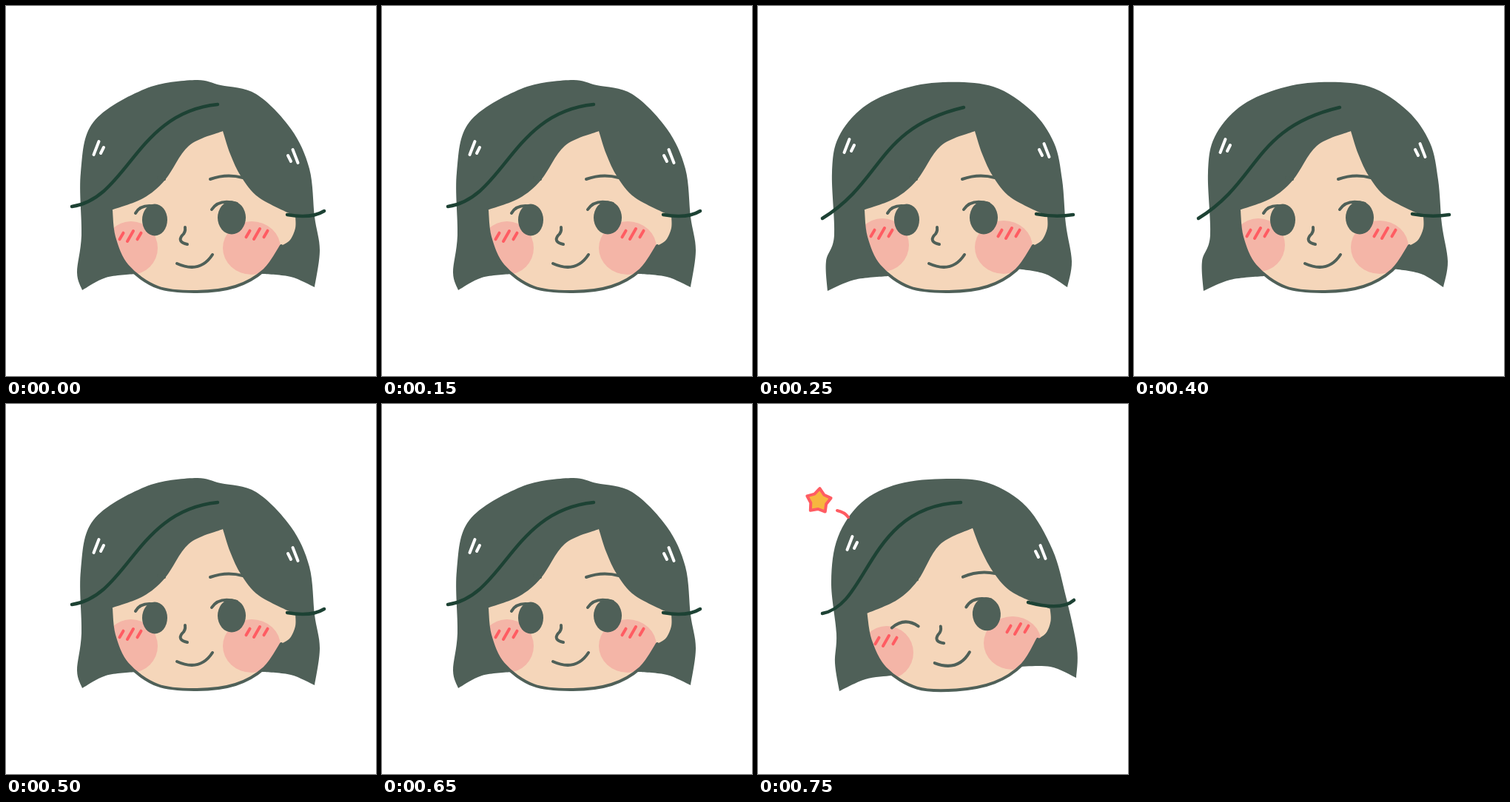
Recreate the animation shown at these times as an HTML page. Size 500 by 500 pixels, loop 1000 ms.

```html
<!DOCTYPE html>
<html lang="en">
<head>
<meta charset="utf-8">
<title>Winking girl</title>
<style>
html, body { margin: 0; width: 100%; height: 100%; overflow: hidden; background: #fff; }
svg { display: block; width: 100vw; height: 100vh; }
.line { fill: none; stroke-width: 4; stroke-linecap: round; stroke-linejoin: round; }
</style>
</head>
<body>
<svg id="stage" viewBox="0 0 500 500"></svg>
<script>
const HAIR = '#4f6058', SKIN = '#f5d6ba', CHEEK = '#f4b5a7', BLUSH = '#ff5c62',
      STRAND = '#1d4234', SHINE = '#ffffff', STAR = '#f7b63f';
const STEP = 250;

// Smooth runs of key points; "|" marks a corner.
const JAW = '142,276 146,312 164,351 205,380 258,386 310,379 349,357 372,324';
const FACE = JAW + '| 384,316 391,300 391,284 | 342,259 318,231 303,200 293,169'
  + '| 247,189 215,235 185,260 142,276';

const poses = [
  {
    hair: '103,384 | 96,360 102,310 101,225 118,157 188,112 255,100 290,107 338,119 385,166 410,220 417,285 424,330 417,380 | 385,366 347,362 | 175,362 | 135,367 103,384',
    strands: ['M89 271C165 260 175 144 286 133', 'M380 282Q412 288 430 277'],
    blush: [[168, 311], [339, 308]],
    shine: [[122, 192], [391, 203]]
  },
  {
    hair: '94,385 | 92,345 103,310 100,225 109,177 142,137 192,113 250,103 318,109 370,142 400,185 411,235 416,295 424,345 418,380 | 388,362 350,355 | 175,365 | 130,370 94,385',
    strands: ['M87 287C170 236 160 165 278 137', 'M376 281Q402 286 426 282'],
    blush: [[167, 307], [339, 307]],
    shine: [[120, 189], [390, 195]]
  },
  {
    hair: '110,388 | 104,350 106,310 99,240 108,180 140,133 190,108 255,101 312,107 363,139 398,197 416,260 431,330 430,370 | 395,355 350,355 | 180,367 | 145,372 110,388',
    strands: ['M87 283C150 272 148 138 274 133', 'M365 268Q410 280 427 265'],
    blush: [[173, 320], [351, 304]],
    shine: [[124, 188], [385, 200]],
    tilt: -3.4,
    wink: true
  }
];
const sequence = [0, 1, 0, 2];

// Catmull-Rom spline written as cubic Béziers
function curve(points) {
  return points.slice(1).map((end, i) => {
    const start = points[i], before = points[i - 1] || start, after = points[i + 2] || end;
    const c1 = start.map((v, k) => v + (end[k] - before[k]) / 6);
    const c2 = end.map((v, k) => v - (after[k] - start[k]) / 6);
    return `C${c1} ${c2} ${end}`;
  }).join('');
}

function smooth(text) {
  const runs = text.split('|').map(run => run.trim().split(' ').map(p => p.split(',').map(Number)));
  return 'M' + runs[0][0] + runs.map((run, i) =>
    curve(i ? [runs[i - 1].at(-1), ...run] : run)).join('');
}

const line = (d, color, width = 4) =>
  `<path class="line" d="${d}" stroke="${color}" style="stroke-width:${width}"/>`;
const ellipse = (cx, cy, rx, ry, fill) =>
  `<ellipse cx="${cx}" cy="${cy}" rx="${rx}" ry="${ry}" fill="${fill}"/>`;
const stroke = (x, y, dx, dy, color) =>
  line(`M${x - dx} ${y - dy}L${x + dx} ${y + dy}`, color);

const blushMarks = ([x, y]) => [-1, 0, 1].map(i => {
  const half = i ? 5 : 8;
  return stroke(x + 12 * i, y, half / 2, -half * 0.87, BLUSH);
}).join('');

const shineMarks = ([x, y], side) =>
  stroke(x, y, -3.5 * side, 9, SHINE) + stroke(x + 8 * side, y + 3, -2 * side, 4, SHINE);

function drawStar(cx, cy) {
  const points = Array.from({ length: 10 }, (_, i) => {
    const radius = i % 2 ? 11 : 17, angle = (i * 36 - 85) * Math.PI / 180;
    return [cx + radius * Math.cos(angle), cy + radius * Math.sin(angle)];
  });
  return `<polygon class="line" points="${points.join(' ')}" stroke="${BLUSH}" style="fill:${STAR}"/>`
    + line('M107 144Q117 146 122 153', BLUSH);
}

function drawFeatures(wink) {
  const leftEye = wink
    ? line('M176 297Q194 283 212 297', HAIR)
    : ellipse(201, 289, 17, 21.5, HAIR) + line('M175 280Q182 267 203 271', HAIR);
  const ink = [
    'M278 275Q288 260 312 267',
    'M276 234Q298 226 320 232',
    'M206 232L214 234',
    'M242 299Q243 306 238 310Q231 319 245 322',
    'M231 348Q262 362 279 336'
  ];
  return leftEye + ellipse(305, 286, 19, 22.5, HAIR) + ink.map(d => line(d, HAIR)).join('');
}

function drawPose({ hair, strands, blush, shine, tilt = 0, wink }, id) {
  const turn = `transform="rotate(${tilt} 270 219)"`;
  const face = `<path d="${smooth(FACE)}Z" fill="${SKIN}" ${turn}/>`;
  const [left, right] = blush;
  return `<g>
    <clipPath id="face${id}">${face}</clipPath>
    <path d="${smooth(hair)}Z" fill="${HAIR}"/>${face}
    <g clip-path="url(#face${id})">
      ${ellipse(left[0] + 1, left[1] + 16, 36, 36, CHEEK)}
      ${ellipse(right[0] - 7, right[1] + 19, 39, 36, CHEEK)}
    </g>
    <g ${turn}>${line(smooth(JAW), HAIR)}${drawFeatures(wink)}</g>
    ${blush.map(blushMarks).join('')}
    ${strands.map(d => line(d, STRAND, 4.5)).join('')}
    ${shineMarks(shine[0], 1)}${shineMarks(shine[1], -1)}
    ${wink ? drawStar(82, 131) : ''}
  </g>`;
}

const stage = document.getElementById('stage');
stage.innerHTML = poses.map(drawPose).join('');
const groups = [...stage.children];

function render(time) {
  const current = sequence[Math.floor(time / STEP) % sequence.length];
  groups.forEach((group, i) => group.setAttribute('visibility', i === current ? 'visible' : 'hidden'));
}

const begin = performance.now();
function tick() {
  render(performance.now() - begin);
  requestAnimationFrame(tick);
}
tick();
</script>
</body>
</html>
```
